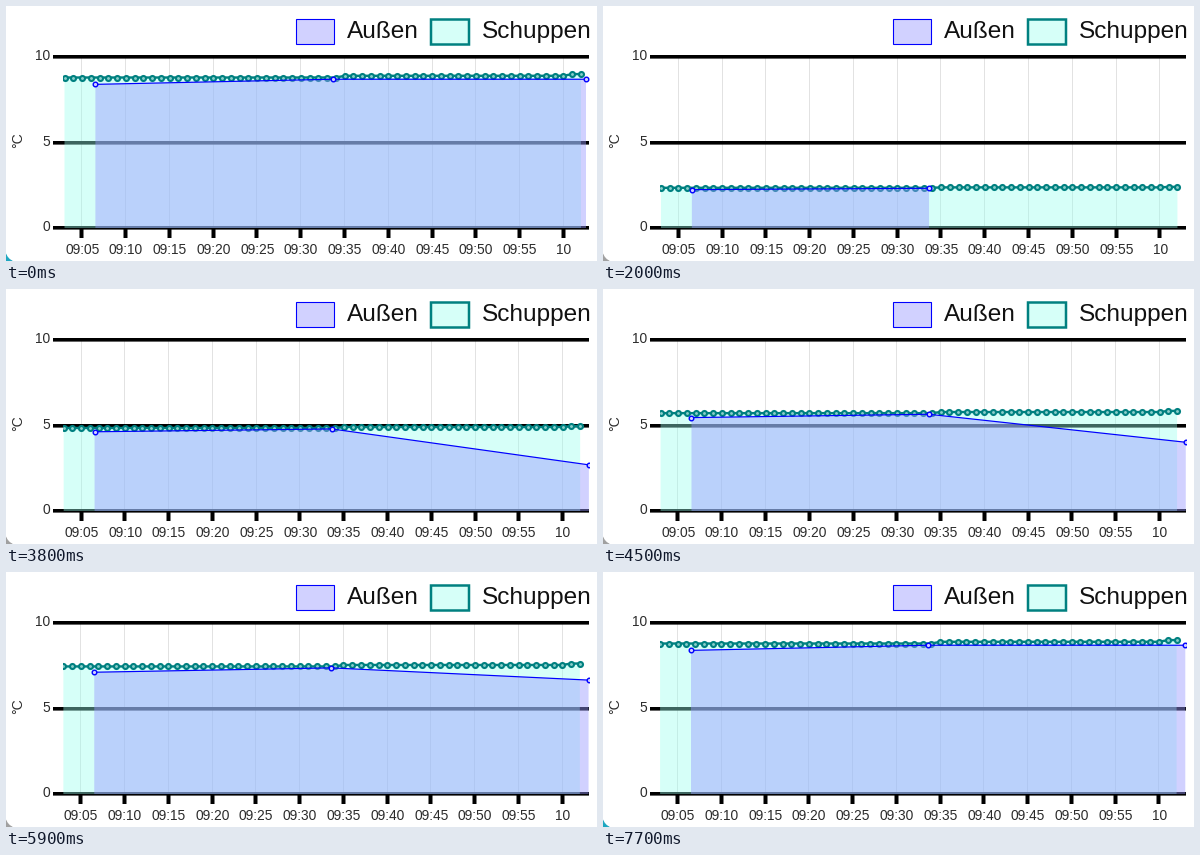
A matplotlib script for the animation above (7.8 s loop, 591x255 px).

```python
import numpy as np
import matplotlib.pyplot as plt
from matplotlib.animation import FuncAnimation
from matplotlib.patches import Polygon, Rectangle, PathPatch
from matplotlib.path import Path

W, H, DPI = 591, 255, 64
PX = 72 / DPI                      # points per pixel
FRAMES, STEP = 78, 100
LEFT, RIGHT, BASE = 57, 583, 222
MINUTE = 8.754                     # pixels per minute
UNIT = 17.1                        # pixels per degree

TEAL, BLUE = "#008080", "#0000ff"
TEAL_FILL = (0.6, 1.0, 0.933, 0.4)
BLUE_FILL = (0.6, 0.6, 1.0, 0.45)
CYAN, GREY = "#1ba6c0", "#a0a0a0"

CLEAR, GROW, UPDATE, DONE = 300, 650, 2370, 6980

plt.rcParams["font.family"] = "Liberation Sans"
plt.rcParams["path.snap"] = False
fig = plt.figure(figsize=(W / DPI, H / DPI), dpi=DPI, facecolor="white")
ax = fig.add_axes([0, 0, 1, 1])
ax.set_xlim(0, W)
ax.set_ylim(H, 0)
ax.axis("off")

area = Rectangle((LEFT, 0), RIGHT - LEFT, H, transform=ax.transData)


def line(xs, ys, color, width, z, **kw):
    kw.setdefault("solid_capstyle", "butt")
    return ax.plot(xs, ys, color=color, lw=width * PX, zorder=z, **kw)[0]


def label(x, y, s, size, color="#2b2b2b", **kw):
    kw.setdefault("va", "baseline")
    return ax.text(x, y, s, fontsize=size * PX, color=color, zorder=2, **kw)


class Series:
    """Filled line with ring markers, clipped to the plot area."""

    def __init__(self, color, fill, width, ring, edge, face, z):
        self.fill = Polygon([(0, 0), (0, 0), (0, 0)], fc=fill, ec="none", zorder=z)
        ax.add_patch(self.fill)
        self.line = line([], [], color, width, z + 0.1, solid_joinstyle="round")
        self.dots = line([], [], color, 0, z + 0.2, marker="o", ms=ring * PX,
                         mew=edge * PX, mfc=face, mec=color)
        self.parts = (self.fill, self.line, self.dots)
        for part in self.parts:
            part.set_snap(False)
            part.set_clip_path(area)

    def show(self, on):
        for part in self.parts:
            part.set_visible(on)

    def place(self, xs, values):
        ys = BASE - UNIT * np.asarray(values)
        self.line.set_data(xs, ys)
        self.dots.set_data(xs, ys)
        top = np.column_stack([xs, ys])
        self.fill.set_xy(np.vstack([[xs[0], BASE], top, [xs[-1], BASE]]))


# legend
for x, name, tx, fc, ec, lw in (
        (290.5, "Außen", 341, BLUE_FILL, BLUE, 1.1),
        (425, "Schuppen", 475.5, TEAL_FILL, TEAL, 2.5)):
    for face, edge in ((fc, "none"), ("none", ec)):
        ax.add_patch(Rectangle((x, 13.5), 38, 25, fc=face, ec=edge, lw=lw * PX,
                               joinstyle="miter"))
    label(tx, 32, name, 24.4, "#111111")

# value axis
for v in (0, 5, 10):
    y = np.floor(BASE - UNIT * v + 0.5) - 0.2
    line([47, RIGHT], [y, y], "black", 3.6, 1)
    label(44, y + 3.4, str(v), 13.7, ha="right")
label(12, 134, "°C", 14, rotation=90, ha="center", va="center")

# time axis
names = [f"09:{m:02d}" for m in range(5, 60, 5)] + ["10"]
grid = [line([0, 0], [52, BASE], "#e2e2e2", 1, 0.5) for _ in names]
ticks = [line([0, 0], [BASE, 232], "black", 4, 1) for _ in names]
texts = [label(0, 247.5, s, 13.7, ha="center") for s in names]

# card corner
corner = PathPatch(Path([(-1, 246), (1, 253.5), (8, 256), (-1, 256)],
                        [Path.MOVETO, Path.CURVE3, Path.CURVE3, Path.LINETO]),
                   lw=PX, zorder=6)
ax.add_patch(corner)

shed = Series(TEAL, TEAL_FILL, 2.4, 5, 2.1, "#8ccfca", 3)
outside = Series(BLUE, BLUE_FILL, 1.2, 4.6, 1.4, "#d0d0ff", 4)

k = np.arange(60)
shed_x = 58.5 + MINUTE * k
shed_v = 8.8 + 0.1 * (k >= 32) + 0.1 * (k >= 58)
out_x = np.array([89.4, 326.6, 583.7])
out_v = np.array([8.4, 8.7, 8.7])


def draw(i):
    t = i * STEP
    before = t < CLEAR
    shift = 0 if before else -0.25 - 0.00015 * t

    for n, (g, tick, text) in enumerate(zip(grid, ticks, texts)):
        x = 75.9 + 5 * MINUTE * n + shift
        mid = np.floor(x) + 0.5
        g.set_xdata([mid, mid])
        tick.set_xdata([mid, mid])
        text.set_x(x + 0.3)

    corner.set_color(CYAN if before or t >= 7400 else GREY)

    # linear rise, restarted from the current height when the last value arrives
    last = np.clip((t - UPDATE) / (DONE - UPDATE), 0, 1)
    rise = np.interp(t, [GROW, 1000, 2000, UPDATE, DONE], [0, 0.07, 0.267, 0.35, 1])
    ox = out_x + shift
    if before:
        rise = last = 1
        ox[2] = 580

    shown = before or t >= GROW
    shed.show(shown)
    outside.show(shown)
    count = 3 if before or t >= UPDATE else 2
    shed.place(shed_x + shift, shed_v * rise)
    outside.place(ox[:count], (out_v * [rise, rise, last])[:count])
    return []


anim = FuncAnimation(fig, draw, frames=FRAMES, interval=STEP, repeat=True,
                     repeat_delay=0, blit=False)
plt.show()
```
